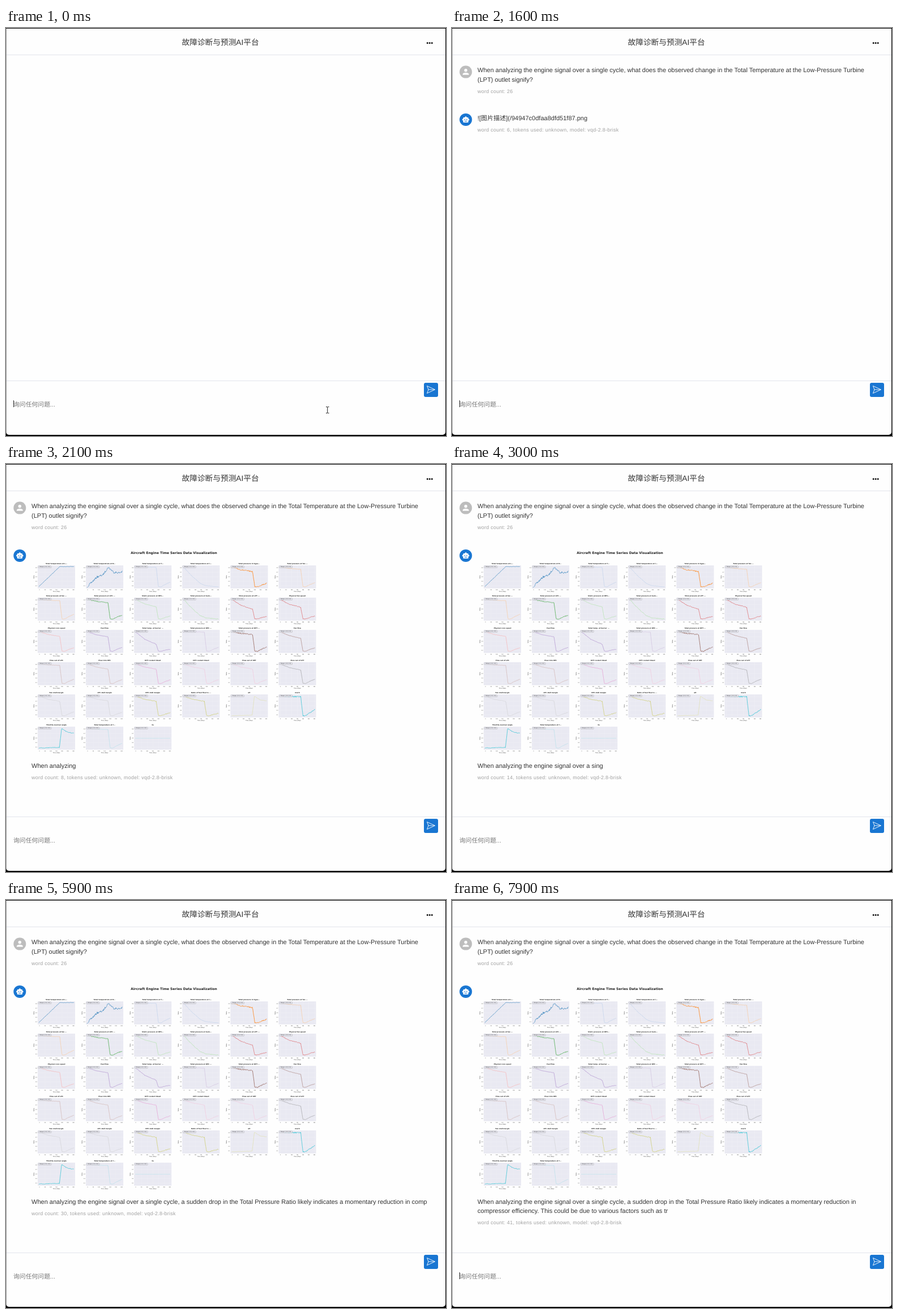
Animation of 777 by 721 pixels, one loop 8000 ms. Source, as an HTML page:

```html
<!DOCTYPE html>
<html lang="zh-CN">
<head>
<meta charset="utf-8">
<title>Chat</title>
<style>
  html, body { margin: 0; width: 100%; height: 100%; overflow: hidden; background: #000; }
  body { position: relative; font: 11.02px/16.5px "Liberation Sans", "Noto Sans CJK SC", "Noto Sans CJK", sans-serif;
    color: #333; text-rendering: geometricPrecision; }
  .window { position: absolute; left: 0; top: 1px; width: 775px; height: 718px; background: #fefefe;
    border-left: 1px solid #999; border-radius: 0 0 5px 5px; }
  .rule { position: absolute; left: 1px; width: 775px; height: 1px; background: #e1e4ec; }
  svg { position: absolute; left: 0; top: 0; }
  .title { position: absolute; left: 310.5px; top: 18.4px; font-size: 13.7px; white-space: nowrap; }
  .hint { position: absolute; left: 13px; top: 658px; font-size: 10.83px; color: #777; white-space: nowrap; }
  .message { position: absolute; left: 45px; width: 706px; }
  .message p { margin: 0; min-height: 16.5px; overflow-wrap: anywhere; }
  .message .meta { margin-top: 3.6px; font-size: 8.91px; letter-spacing: .0333em; color: #a0a0a0; }
  #question { top: 67px; }
</style>
</head>
<body>
<div class="window"></div>
<div class="rule" style="top:47px"></div>
<div class="rule" style="top:623px"></div>
<div class="title">故障诊断与预测AI平台</div>
<div class="hint">询问任何问题...</div>

<div class="message" id="question"><p></p><p class="meta"></p></div>
<div class="message" id="answer"><p></p><p class="meta"></p></div>

<svg width="777" height="721" viewBox="0 0 777 721">
  <g fill="#111"><circle cx="744.2" cy="26.5" r="1.5"/><circle cx="748.2" cy="26.5" r="1.5"/><circle cx="752.2" cy="26.5" r="1.5"/></g>
  <rect x="738" y="627" width="25" height="25" rx="3" fill="#1976d2"/>
  <path d="M743.5 632.5 L757.5 639 L743.5 645.5 L746 639 Z M746 639 H757" fill="none" stroke="#fff" stroke-width=".9" stroke-linejoin="round"/>
  <g id="userIcon" transform="translate(13.3 66.6)">
    <circle cx="11" cy="11" r="11" fill="#bdbdbd"/>
    <circle cx="11" cy="8.2" r="2.7" fill="#fff"/>
    <path d="M5.6 16.2 V14.9 C5.6 11.4 16.4 11.4 16.4 14.9 V16.2 Z" fill="#fff"/>
  </g>
  <g id="botIcon" transform="translate(13.3 150.9)">
    <circle cx="11" cy="11" r="11" fill="#1976d2"/>
    <g fill="#fff">
      <circle cx="11" cy="7" r="1.7"/><rect x="6.4" y="7" width="9.2" height="9.1" rx="1.1"/>
      <circle cx="6.4" cy="11" r="1.7"/><circle cx="15.6" cy="11" r="1.7"/>
    </g>
    <path d="M8.7 13.8 H13.3" stroke="#1976d2"/>
    <circle cx="9.3" cy="10.7" r=".9" fill="#1976d2"/><circle cx="12.7" cy="10.7" r=".9" fill="#1976d2"/>
  </g>
  <g id="charts"></g>
  <rect id="caret" x="13" y="658" width="1" height="12" fill="#222"/>
  <path id="pointer" d="M565 669.5 H567 L567.7 670 L568.4 669.5 H570.5 M567.7 670 V680 M565 680.5 H567 L567.7 680 L568.4 680.5 H570.5" fill="none" stroke="#222"/>
</svg>

<script>
const LOOP = 8000, STEP = 100;
const MODEL = 'vqd-2.8-brisk';
const QUESTION = 'When analyzing the engine signal over a single cycle, what does the observed change in the Total Temperature at the Low-Pressure Turbine (LPT) outlet signify?';
const IMAGE = '![图片描述](/94947c0dfaa8dfd51f87.png)';
const REPLY = IMAGE + '\n\nWhen analyzing the engine signal over a single cycle, a sudden drop in the Total Pressure Ratio likely indicates a momentary reduction in compressor efficiency. This could be due to various factors such as tr';
// Streaming pace: [ms, characters received]
const PACE = [[500, 0], [600, 1], [1600, 33], [2100, 50], [3000, 80], [4500, 131], [5900, 178], [7900, 244]];

const $ = id => document.getElementById(id);
const show = (id, on) => { $(id).style.display = on ? '' : 'none'; };
const countWords = text => (text.match(/[\u4e00-\u9fff]|\w+/g) || []).length;

function interpolate(points, x) {
  if (x <= points[0][0]) return points[0][1];
  for (let i = 1; i < points.length; i++) {
    const [x0, y0] = points[i - 1], [x1, y1] = points[i];
    if (x <= x1) return y0 + (y1 - y0) * (x - x0) / (x1 - x0);
  }
  return points[points.length - 1][1];
}

// Curves in axes coordinates, y pointing down
const drop = (knee, end) => [[.03, .07], [.28, .07 + (knee - .07) * .6], [.59, knee], [.65, .92], [.72, .93], [.85, (end + .9) / 2], [.97, end]];
const rise = [[.03, .93], [.58, .9], [.64, .08], [.8, .24], [.97, .28]];
const ramp = [[.03, .92], [.59, .05], [.97, .05]];
const climb = [[.04, .92], [.3, .5], [.45, .42], [.6, .08], [.75, .3], [.9, .32], [.97, .27]];
const decay = [[.03, .06], [.25, .45], [.48, .78], [.62, .88], [.97, .93]];
const flat = [[.03, .5], [.97, .5]];

// [title, curve, noise, line width]
const PLOTS = [
  ['Total temperature at L...', ramp, .02, .65], ['Total temperature at H...', climb, .09, .65],
  ['Total temperature at f...', drop(.08, .72)], ['Total temperature at l...', decay],
  ['Total pressure in bypa...', drop(.27, .78), .05, .9], ['Total pressure at fan ...', drop(.17, .75)],
  ['Total pressure at fan ...', drop(.13, .72)], ['Total pressure at LPC ...', drop(.22, .76), .03, .75],
  ['Static pressure at HPC...', drop(.4, .8)], ['Total pressure at burn...', decay, .03],
  ['Total pressure at LPT ...', drop(.5, .82), .03], ['Physical fan speed', drop(.42, .8), .03],
  ['Physical core speed', drop(.28, .78)], ['Fuel flow', drop(.3, .76)],
  ['Total temp. at burner ...', drop(.62, .85), .02], ['Total pressure at HPC ...', drop(.09, .76)],
  ['Total pressure at HPT ...', drop(.2, .74), .05, .85], ['Fan flow', drop(.36, .78)],
  ['Flow out of LPC', drop(.14, .74)], ['Flow into HPC', drop(.3, .76)],
  ['HPT coolant bleed', drop(.3, .77)], ['HPT coolant bleed', drop(.3, .76)],
  ['Flow out of HPT', drop(.3, .76)], ['Flow out of LPT', drop(.34, .74)],
  ['Fan stall margin', drop(.3, .76)], ['LPC stall margin', drop(.28, .78)],
  ['HPC stall margin', drop(.3, .8), .03], ['Ratio of fuel flow to ...', drop(.3, .82), .03],
  ['alt', rise], ['mach', drop(.1, .66), .05, .75],
  ['Throttle-resolver angle', rise, .03, .75], ['Total temperature at f...', drop(.12, .72)],
  ['hs', flat, 0]
];
const PALETTE = ('1f77b4 aec7e8 ff7f0e ffbb78 2ca02c 98df8a d62728 ff9896 9467bd c5b0d5 ' +
  '8c564b c49c94 e377c2 f7b6d2 7f7f7f c7c7c7 bcbd22 dbdb8d 17becf 9edae5').split(' ');

let seed = 7;
const random = () => (seed = seed * 16807 % 2147483647) / 2147483647;

const label = (x, y, size, text, extra = '') =>
  `<text x="${x}" y="${y}" font-size="${size}" ${extra}>${text}</text>`;

function plot([title, curve, noise = .015, width = .55], index) {
  const W = 66, H = 40.5;
  const x = 56 + index % 6 * 85.1, y = 179.3 + Math.floor(index / 6) * 57;
  const color = PALETTE[Math.min(19, Math.floor(index / 32 * 20))];
  let path = '', grid = '', ticks = '';
  for (let u = .03; u <= .975; u += .01) {
    const v = interpolate(curve, u) + noise * (random() - .5);
    path += `${path ? 'L' : 'M'}${(u * W).toFixed(2)} ${(v * H).toFixed(2)}`;
  }
  for (let i = 0; i < 7; i++) {
    const tx = 3 + i * 10;
    grid += `M${tx} 0V${H}`;
    ticks += label(tx, H + 3, 1.9, i * 50);
  }
  for (let i = 0; i < 5; i++) {
    const ty = 4 + i * 8;
    grid += `M0 ${ty}H${W}`;
    ticks += label(-1, ty + .7, 1.9, (.9 - i * .2).toFixed(1), 'text-anchor="end"');
  }
  return `<g transform="translate(${x.toFixed(1)} ${y})">
    <rect width="${W}" height="${H}" fill="#e9e9f2"/>
    <path d="${grid}" stroke="#fff" stroke-width=".15"/>
    <path d="${path}" fill="none" stroke="#${color}" stroke-opacity=".85" stroke-width="${width}" stroke-linejoin="round"/>
    <rect x="1" y=".9" width="23" height="3.2" rx=".4" fill="#e9e9f2" stroke="#999" stroke-width=".4"/>
    ${label(12.5, 3.2, 2.1, 'Range: [-1.0, 1.0]')}
    ${label(W / 2, -2.2, 2.75, title, 'font-weight="bold"')}
    ${ticks}
    ${label(W / 2, H + 6, 2.2, 'Time (Step)')}
    ${label(0, 0, 2.2, 'Value', `transform="translate(-6 ${H / 2}) rotate(-90)"`)}
  </g>`;
}

$('charts').innerHTML = `<g font-family="DejaVu Sans, sans-serif" text-anchor="middle" fill="#222">
  ${label(296.5, 159.2, 5.87, 'Aircraft Engine Time Series Data Visualization', 'font-weight="bold"')}
  ${PLOTS.map(plot).join('')}</g>`;

function setMessage(id, text, meta) {
  const [body, info] = $(id).children;
  body.textContent = text;
  info.textContent = meta;
}
setMessage('question', QUESTION, `word count: ${countWords(QUESTION)}`);

function render(t) {
  const received = REPLY.slice(0, Math.floor(interpolate(PACE, t) + .001));
  const hasImage = received.length >= IMAGE.length;
  setMessage('answer', hasImage ? received.slice(IMAGE.length).trimStart() : received,
    `word count: ${countWords(received)}, tokens used: unknown, model: ${MODEL}`);
  $('answer').style.top = hasImage ? '525.6px' : '151.6px';
  show('charts', hasImage);
  for (const id of ['question', 'userIcon']) show(id, t >= 100);
  for (const id of ['answer', 'botIcon']) show(id, t >= 200);
  show('pointer', t < 100);
  show('caret', t < 100 || (t - 40) % 1060 < 530);
}

let shown = -1;
const start = performance.now();
function tick() {
  const t = Math.floor((performance.now() - start) % LOOP / STEP) * STEP;
  if (t !== shown) render(shown = t);
  requestAnimationFrame(tick);
}
tick();
</script>
</body>
</html>
```
